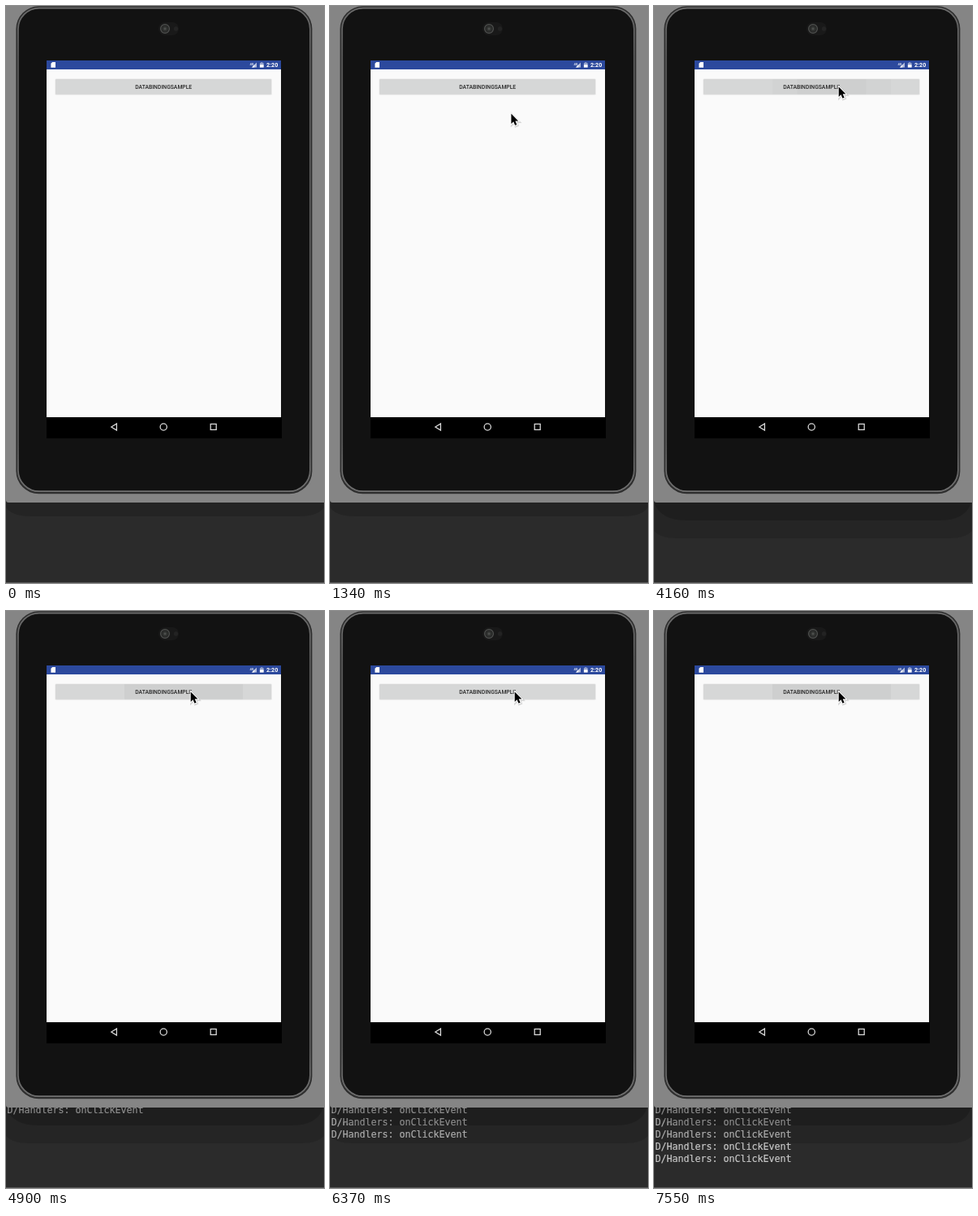
Recreate the animation shown at these times as an HTML page. Size 392 by 710 pixels, loop 8 s.

```html
<!DOCTYPE html>
<html lang="en">
<head>
<meta charset="utf-8">
<title>Button click log</title>
<style>
  html, body { margin: 0; width: 100%; height: 100%; overflow: hidden; background: #2b2b2b; }
  svg { display: block; width: 392px; height: 710px; }
  .ui { font-family: Roboto, sans-serif; font-weight: 500; }
  #log { font: 11.63px "DejaVu Sans Mono", monospace; fill: #c8c8c8; stroke: #c8c8c8; stroke-width: .2; white-space: pre; }
</style>
</head>
<body>
<svg viewBox="0 0 392 710">
  <defs>
    <linearGradient id="rim" x1="0" y1="0" x2="0" y2="1">
      <stop offset="0" stop-color="#6c6c6c"/>
      <stop offset=".1" stop-color="#585858"/>
      <stop offset=".9" stop-color="#585858"/>
      <stop offset="1" stop-color="#707070"/>
    </linearGradient>
    <radialGradient id="lens">
      <stop offset="0" stop-color="#5a5d5a"/>
      <stop offset=".4" stop-color="#303230"/>
      <stop offset="1" stop-color="#222"/>
    </radialGradient>
    <path id="arrow" d="M1.1 1.6V14L3.9 11.3 5.8 15.8 8 14.9 6.1 10.4H9.8Z"/>
  </defs>

  <!-- console -->
  <rect width="392" height="710" fill="#2b2b2b"/>
  <g id="log"></g>
  <path id="shadowSmall" d="M0 605V617Q8 628 30 628H362Q384 628 392 617V605Z" opacity=".16"/>
  <g id="shadowLarge">
    <path d="M0 605V646Q8 655 28 655H364Q384 655 392 646V605Z" opacity=".14"/>
    <path d="M0 605V611Q8 633 40 633H352Q384 633 391 611V605Z" opacity=".19"/>
  </g>
  <rect y="709" width="392" height="1" fill="#555"/>

  <!-- tablet -->
  <path d="M0 0H392V611H3Q0 611 0 608Z" fill="#858585"/>
  <rect x="12.4" y=".3" width="365" height="600" rx="28" fill="#2e2e2e"/>
  <rect x="14.9" y="2.6" width="360" height="594.6" rx="26" fill="#121212" stroke="url(#rim)" stroke-width="1.8"/>
  <rect x="188" y="20" width="25" height="16" rx="8" fill="#191919"/>
  <circle cx="196" cy="28" r="5.4" fill="url(#lens)" stroke="#505250" stroke-width="1.2"/>
  <circle cx="209.5" cy="28" r="2.7" fill="#232323"/>

  <!-- screen -->
  <rect x="50" y="67" width="289" height="440" fill="#fafafa"/>
  <rect x="50" y="67" width="289" height="11" fill="#2c499d"/>
  <rect x="50" y="506" width="290" height="26"/>
  <g class="ui" fill="#fff">
    <path d="M57.2 69H61V75.7H55.4V70.8Z"/>
    <text x="300.5" y="72.5" font-size="4">4G</text>
    <path d="M309 69.5V75.5H303Z" opacity=".65"/>
    <path d="M306.3 72.2V75.5H303Z"/>
    <path d="M314 69.2H316.4V70H317.6V75.5H312.9V70H314Z" opacity=".5"/>
    <path d="M312.9 72.3H317.6V75.5H312.9Z"/>
    <text x="320.9" y="75" font-size="7.2" font-weight="700">2:20</text>
  </g>
  <g fill="none" stroke="#d8d8d8" stroke-width="1.3">
    <path d="M129.8 518L136.4 514V522Z"/>
    <circle cx="194.2" cy="518" r="4.1"/>
    <rect x="252.2" y="514.4" width="7" height="7"/>
  </g>

  <!-- button -->
  <rect x="60.5" y="89.6" width="267.3" height="20" rx="1.3" fill="#e6e6e6"/>
  <rect x="61" y="90" width="266" height="18.7" rx="1" fill="#d6d7d7"/>
  <rect id="outerWave" y="90" height="18.7"/>
  <rect id="innerWave" y="90" height="18.7"/>
  <text class="ui" x="194.2" y="101.8" font-size="6.8" text-anchor="middle" fill="#262626">DATABINDINGSAMPLE</text>

  <g id="cursor">
    <use href="#arrow" x=".8" y="1" fill="none" stroke="#000" stroke-opacity=".14" stroke-width="3"/>
    <use href="#arrow" fill="none" stroke="#fff" stroke-width="1.9"/>
    <use href="#arrow"/>
  </g>
</svg>
<script>
const LOOP = 8000, TICK = 147.8, TICK_OFFSET = 8;
const CLICKS = 5, PRESS = 3130, FIRST_CLICK = 4900;
const $ = id => document.getElementById(id);
const lerp = (a, b, p) => a + (b - a) * p;
const show = (node, on) => { node.style.display = on ? "" : "none"; };

const tickAt = t => Math.floor((t - TICK_OFFSET) / TICK);

// The pointer sweeps in, pauses below the button, then slides onto it.
const path = [
  { tick: 6, x: 361, y: 374.5 },
  { tick: 8, x: 220, y: 311 },
  { tick: 9, x: 222.3, y: 131 },
  { tick: 10, x: 226.6, y: 122.5 },
  { tick: 13, x: 226.6, y: 122.5 },
  { tick: 15, x: 226.6, y: 97.8, easeOut: true }
];

function pointerAt(tick) {
  const next = path.findIndex(key => key.tick > tick);
  if (next < 0) return path[path.length - 1];
  if (next === 0) return null;
  const from = path[next - 1], to = path[next];
  let p = (tick - from.tick) / (to.tick - from.tick);
  if (to.easeOut) p = 1 - (1 - p) ** 3;
  return { x: lerp(from.x, to.x, p), y: lerp(from.y, to.y, p) };
}

// Clicks come slightly faster each time.
const clickTick = i => Math.round((FIRST_CLICK + 760 * i - 24 * i * i) / TICK);

const logLines = Array.from({ length: CLICKS }, (_, i) => {
  const line = document.createElementNS("http://www.w3.org/2000/svg", "text");
  line.setAttribute("x", 1.5);
  line.setAttribute("y", 618 + 15 * i);
  line.textContent = "D/Handlers: onClickEvent";
  $("log").append(line);
  return line;
});

function drawWave(node, age, growth, opacity) {
  const half = 73 * Math.min(1, Math.max(0, age / growth));
  node.setAttribute("x", 219 - half);
  node.setAttribute("width", 2 * half);
  node.setAttribute("opacity", opacity);
}

function draw(t) {
  const tick = tickAt(t);
  const pointer = pointerAt(tick);
  show($("cursor"), pointer);
  if (pointer) $("cursor").setAttribute("transform", `translate(${pointer.x} ${pointer.y})`);

  // The held press spreads in two waves; later clicks make the tint fade and return.
  const heard = Math.max(0, t - FIRST_CLICK);
  const tint = .018 * Math.abs(Math.cos(Math.PI * heard / 2800));
  drawWave($("outerWave"), t - PRESS, 1030, tint);
  drawWave($("innerWave"), t - PRESS, 1770, tint);

  show($("shadowSmall"), tick < 10);
  show($("shadowLarge"), tick >= 10);
  logLines.forEach((line, i) => show(line, tick >= clickTick(i)));
}

const start = performance.now();
function animate() {
  draw((performance.now() - start) % LOOP);
  requestAnimationFrame(animate);
}
animate();
</script>
</body>
</html>
```
